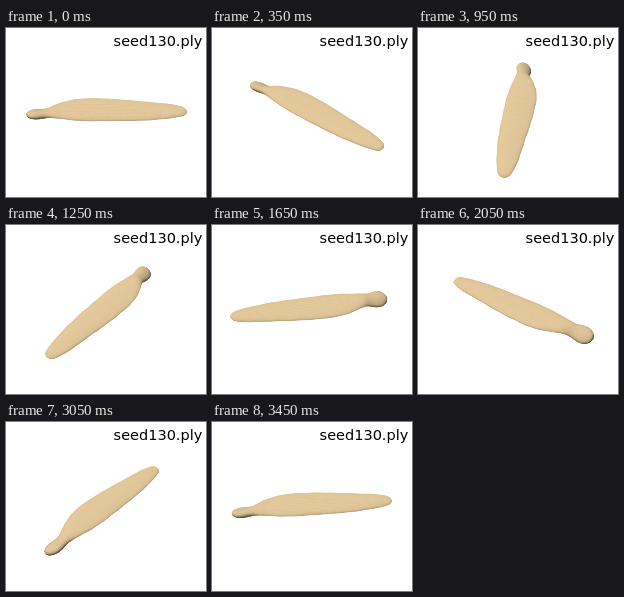
Recreate the animation shown at these times as an HTML page with a canvas. Size 200x169 px, loop 3500 ms.

```html
<!DOCTYPE html>
<html lang="en">
<head>
<meta charset="utf-8">
<title>seed130.ply</title>
<style>
  html, body { margin: 0; width: 100%; height: 100%; overflow: hidden; background: #fff; }
  canvas, svg { position: absolute; left: 0; top: 0; width: 200px; height: 169px; }
  text { font: 14.5px "DejaVu Sans", sans-serif; fill: #000; }
</style>
</head>
<body>
<canvas id="stage" width="200" height="169"></canvas>
<svg viewBox="0 0 200 169"><text x="107.6" y="18">seed130.ply</text></svg>
<script>
const LOOP = 3500, STEP = 50;
const SUB = 5, SIDES = 44;
const EYE = 350, TILT = Math.SQRT1_2;
const LIGHT = [-0.4, 0.6, 0.69];
const BASE = [242, 212, 163];
const ctx = document.getElementById('stage').getContext('2d');

// Cross sections: position, front edge, back edge, half thickness
const SECTIONS = [
  [-79, 2.5, 2.5, 0], [-77.5, 6.5, -1.5, 2.6], [-73, 9.6, -4.4, 3.8],
  [-67, 10, -5, 4.2], [-58, 8.5, -4.5, 3.8], [-50, 9.5, -7.5, 4],
  [-42, 11, -11.3, 4], [-22, 13.5, -16, 4.2], [8, 13.5, -15, 4.2],
  [38, 12.8, -11.2, 4], [62, 10, -8, 3.5], [74, 7.5, -5, 2.6],
  [78.5, 5, -2.3, 1.7], [80, 1.5, 1.5, 0]
];

function spline(a, b, c, d, t) {
  return b + t / 2 * (c - a + t * (2 * a - 5 * b + 4 * c - d + t * (3 * (b - c) + d - a)));
}

// 1 on the stalk, 0 on the body
const stalk = x => 1 / (1 + Math.exp((x + 57) / 3));

function buildRings() {
  const rings = [], last = SECTIONS.length - 1;
  for (let i = 0; i <= last * SUB; i++) {
    const k = Math.min(Math.floor(i / SUB), last - 1), t = i / SUB - k;
    const at = n => SECTIONS[Math.max(0, Math.min(last, n))];
    const [x, front, back, h] = SECTIONS[0].map((_, n) =>
      spline(at(k - 1)[n], at(k)[n], at(k + 1)[n], at(k + 2)[n], t));
    const mid = (front + back) / 2;
    const half = (front - back) / 2 * (1 + 0.015 * Math.sin(x * 0.33));
    const lift = 1 - 3 * stalk(x), roll = 0.35 * stalk(x);
    rings.push(Array.from({ length: SIDES }, (_, j) => {
      const a = j / SIDES * 2 * Math.PI, v = half * Math.cos(a);
      return [x, mid + v, lift + roll * v + h * Math.sin(a)];
    }));
  }
  return rings;
}

const rings = buildRings();

// View space: right, up, towards the eye
function toView([x, v, z], cos, sin) {
  const front = x * sin + v * cos;
  const p = [x * cos - v * sin, (z - front) * TILT, (z + front) * TILT];
  const s = EYE / (EYE - p[2]);
  p.sx = 100 + p[0] * s;
  p.sy = 83 - p[1] * s;
  return p;
}

const sub = (a, b) => [a[0] - b[0], a[1] - b[1], a[2] - b[2]];
const dot = (a, b) => a[0] * b[0] + a[1] * b[1] + a[2] * b[2];
const cross = (a, b) => [
  a[1] * b[2] - a[2] * b[1], a[2] * b[0] - a[0] * b[2], a[0] * b[1] - a[1] * b[0]
];

function draw(angle) {
  const cos = Math.cos(angle), sin = Math.sin(angle);
  const pts = rings.map(ring => ring.map(p => toView(p, cos, sin)));
  const faces = [];
  for (let i = 0; i + 1 < pts.length; i++) {
    const contrast = 0.2 + 0.35 * stalk(rings[i][0][0]);
    for (let j = 0; j < SIDES; j++) {
      const n = (j + 1) % SIDES;
      const quad = [pts[i][j], pts[i + 1][j], pts[i + 1][n], pts[i][n]];
      const normal = cross(sub(quad[2], quad[0]), sub(quad[3], quad[1]));
      if (dot(normal, sub([0, 0, EYE], quad[0])) <= 0) continue;
      const lit = Math.max(0, dot(normal, LIGHT) / Math.hypot(...normal));
      faces.push({ quad, shade: 0.94 - contrast * (1 - lit ** 0.7), depth: quad[0][2] + quad[2][2] });
    }
  }
  faces.sort((a, b) => a.depth - b.depth);

  ctx.fillStyle = '#fff';
  ctx.fillRect(0, 0, 200, 169);
  ctx.lineWidth = 0.5;
  ctx.lineJoin = 'round';
  for (const { quad, shade } of faces) {
    ctx.fillStyle = ctx.strokeStyle = `rgb(${BASE.map(c => Math.round(c * shade)).join()})`;
    ctx.beginPath();
    for (const p of quad) ctx.lineTo(p.sx, p.sy);
    ctx.closePath();
    ctx.fill();
    ctx.stroke();
  }
}

let shown = -1;
function tick() {
  const step = Math.floor(performance.now() % LOOP / STEP);
  if (step !== shown) {
    shown = step;
    draw(step * STEP / LOOP * 2 * Math.PI);
  }
  requestAnimationFrame(tick);
}
tick();
</script>
</body>
</html>
```
